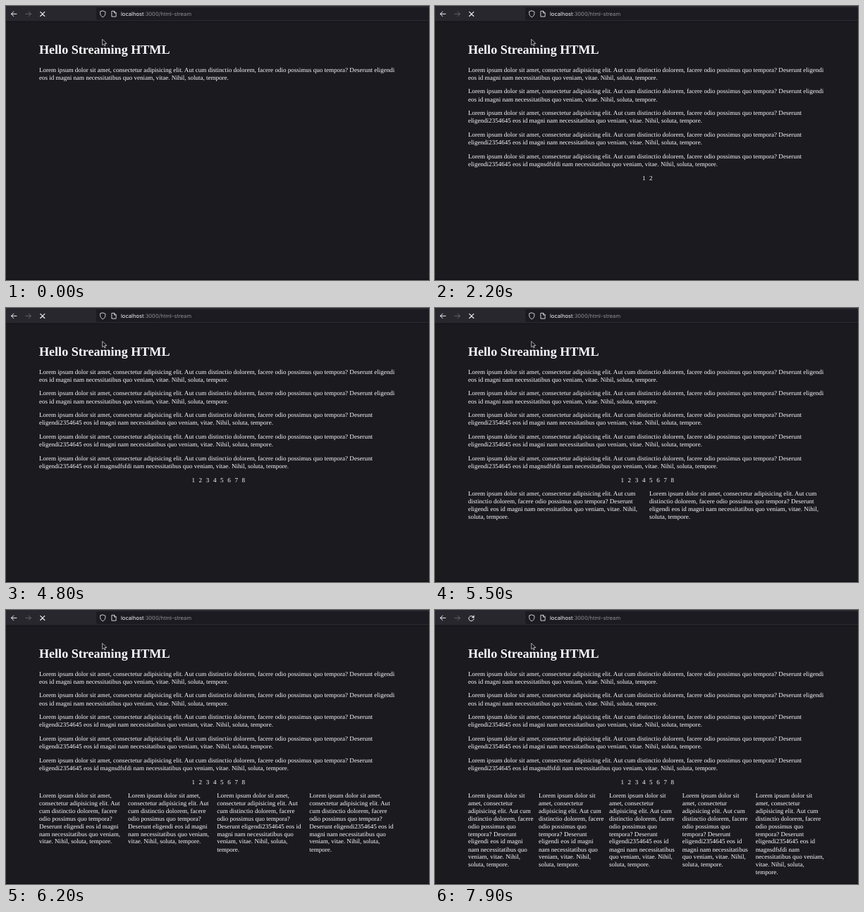
These frames come from a looping animation (600x390 px, 8100 ms). An HTML page:

```html
<!DOCTYPE html>
<html lang="en">
<head>
<meta charset="utf-8">
<title>Streaming HTML</title>
<style>
html, body { margin: 0; width: 100%; height: 100%; overflow: hidden; background: #1b1a1f; }
#stage { position: relative; width: 600px; height: 390px; overflow: hidden; background: #1b1a1f; }
#chrome { position: absolute; left: 0; top: 0; }
#page {
  position: absolute; left: 46.9px; top: 85.8px; width: 900px;
  transform: scale(.565); transform-origin: 0 0;
  font: 16px/19.2px "Liberation Serif", "Times New Roman", serif;
  color: #fbfbfe; text-rendering: geometricPrecision;
}
h1 { position: absolute; left: 0; top: -61px; margin: 0; font-size: 32px; line-height: 38.4px; white-space: nowrap; }
p { margin: 0 0 16px; }
.row { display: flex; gap: 10px; margin-bottom: 16px; min-height: 19.2px; }
#pager { justify-content: center; }
</style>
</head>
<body>
<div id="stage">
  <div id="page">
    <h1>Hello Streaming HTML</h1>
    <div id="paras"></div>
    <div id="pager" class="row"></div>
    <div id="cols" class="row"></div>
  </div>
  <svg id="chrome" width="600" height="390" viewBox="0 0 600 390" fill="none" stroke-linecap="round" stroke-linejoin="round">
    <rect width="600" height="22" fill="#28272e"/>
    <rect x="128" y="2" width="480" height="18" rx="2.3" fill="#1c1b21"/>
    <rect y="21.7" width="600" height=".8" fill="#0e0e11"/>
    <rect y="388.6" width="600" height="1.4" fill="#121118"/>
    <path d="M15 11.3H7.6M10.8 8L7.5 11.3l3.3 3.3" stroke="#f4f4f8" stroke-width="1"/>
    <path d="M28 11.3h7.4M32.2 8l3.3 3.3-3.3 3.3" stroke="#65646c" stroke-width="1"/>
    <path id="stop" d="M-3.1-3.1L3.1 3.1M3.1-3.1L-3.1 3.1" stroke="#f4f4f8" stroke-width="1.1"/>
    <g id="reload" stroke="#f4f4f8">
      <path d="M2.55-2.55A3.6 3.6 0 1 0 3.6 .5" stroke-width="1"/>
      <path d="M4-4.3V-1H.7Z" fill="#f4f4f8" stroke-width=".3"/>
    </g>
    <path d="M137.3 6.9l3.6 1.3v2.4c0 2.6-1.5 4.2-3.6 5.2c-2.1-1-3.6-2.6-3.6-5.2V8.200Z" stroke="#e2e2e6" stroke-width=".9"/>
    <path d="M150.300 7.300h3.300l2.500 2.500v5.300h-5.800ZM153.500 7.300v2.600h2.600" stroke="#e2e2e6" stroke-width=".9"/>
    <text x="163" y="13.7" font-family="Inter, sans-serif" font-size="7.6" fill="#f4f4f8" text-rendering="geometricPrecision">localhost<tspan fill="#8f8e95">:3000/html-stream</tspan></text>
    <path d="M136.700 47.700v8l1.900-1.700 1.300 2.900 1.300-.6-1.200-2.800h2.500Z" fill="#111" stroke="#dcdce0" stroke-width=".75"/>
  </svg>
</div>
<script>
const LOOP = 8100, STEP = 300;
const $ = id => document.getElementById(id);

const lorem = (word, end) =>
  "Lorem ipsum dolor sit amet, consectetur adipisicing elit. Aut cum distinctio dolorem, " +
  "facere odio possimus quo tempora? Deserunt " + word + " eos id " + end +
  " nam necessitatibus quo veniam, vitae. Nihil, soluta, tempore.";
const plain = lorem("eligendi", "magni");
const numbered = lorem("eligendi2354645", "magni");
const typo = lorem("eligendi2354645", "magnsdfsfdi");
const texts = [plain, plain, numbered, numbered, typo];

function add(parent, tag, text, at) {
  const el = document.createElement(tag);
  el.textContent = text;
  $(parent).append(el);
  return { el, at };
}

const chunks = [];
texts.forEach((text, i) => {
  const p = add("paras", "p", text, i ? 100 + i * STEP : 0);
  p.keepsSpace = true;
  chunks.push(p);
});
for (let i = 0; i < 8; i++) chunks.push(add("pager", "span", i + 1, 1900 + i * STEP));
// The second column opens empty, so its gap already narrows the first.
texts.forEach((text, i) => {
  const col = add("cols", "div", text, 4900 + (i > 1 ? i + 1 : i) * STEP);
  if (i === 1) col.fillAt = col.at + STEP;
  col.text = text;
  chunks.push(col);
});

const clamp = v => Math.max(0, Math.min(1, v));
const ease = v => v * v * (3 - 2 * v);

function drawButton(t) {
  const out = ease(clamp((t - 6750) / 250));
  const turn = ease(clamp((t - 6850) / 450));
  const stop = $("stop"), reload = $("reload");
  stop.setAttribute("transform", `translate(51.8 11.4) rotate(${90 * out}) scale(${1 - .7 * out})`);
  stop.setAttribute("opacity", 1 - out);
  reload.setAttribute("transform", `translate(51.5 12) rotate(${180 * (turn - 1)}) scale(${.4 + .6 * turn})`);
  reload.setAttribute("opacity", turn * (t < 7600 ? .4 : 1));
}

function draw(t) {
  for (const c of chunks) {
    const on = t >= c.at;
    if (c.keepsSpace) c.el.style.visibility = on ? "visible" : "hidden";
    else c.el.style.display = on ? "block" : "none";
    if (c.fillAt) {
      const text = t >= c.fillAt ? c.text : "";
      if (c.el.textContent !== text) c.el.textContent = text;
    }
  }
  drawButton(t);
}

function tick() {
  draw(performance.now() % LOOP);
  requestAnimationFrame(tick);
}
tick();
</script>
</body>
</html>
```
